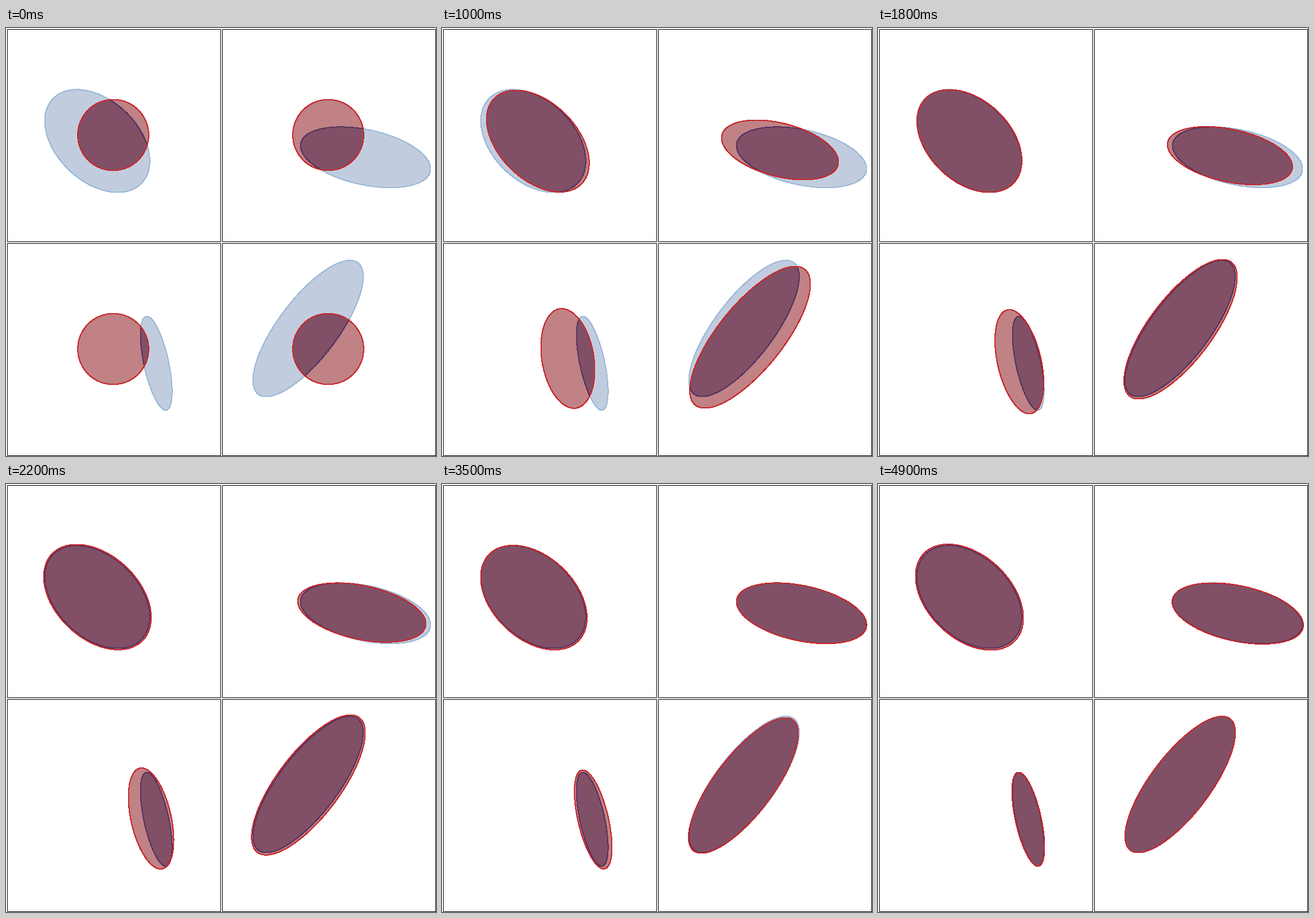
Animation, 750 px wide and 746 px high, one loop 5000 ms. Source, as a matplotlib script:

```python
import numpy as np
import matplotlib.pyplot as plt
from matplotlib.animation import FuncAnimation
from matplotlib.patches import Polygon, Rectangle

WIDTH, HEIGHT, DPI = 750, 746, 128
FRAMES, INTERVAL = 50, 100
PIXEL = 72 / DPI
START_RADIUS = 61.8

BLUE_FILL, BLUE_EDGE = "#c1cddf", "#9cb9d8"
RED_FILL, RED_EDGE = "#c08285", "#c8282c"
OVERLAP_FILL, OVERLAP_EDGE = "#815066", "#56345f"


def ellipse_points(shape):
    """Outline from centre, half extents and the x-y correlation."""
    cx, cy, half_w, half_h, corr = shape
    t = np.linspace(0, 2 * np.pi, 361)
    return np.column_stack([
        cx + 0.5 + half_w * np.cos(t),
        cy + 0.5 + half_h * np.cos(t - np.arccos(corr)),
    ])


class Panel:
    """A fixed target ellipse and a fitted one that moves towards it."""

    def __init__(self, ax, left, top, target, steps):
        ax.add_patch(Rectangle((left + 0.5, top + 0.5), 372, 370, fill=False,
                               ec="black", lw=PIXEL, zorder=0))
        start = (0, left + 185.5, top + 185, START_RADIUS, START_RADIUS, 0)
        keys = np.array([start, *steps], float)
        self.times, self.values = keys[:, 0], keys[:, 1:]

        outline = ellipse_points(target)
        fitted = ellipse_points(self.values[0])

        def shape(points, fill, edge, z):
            patch = Polygon(points, closed=True, fc=fill, ec=edge, lw=PIXEL,
                            aa=False, zorder=z)
            return ax.add_patch(patch)

        shape(outline, BLUE_FILL, BLUE_EDGE, 1)
        self.fill = shape(fitted, RED_FILL, "none", 2)
        self.overlap = shape(outline, OVERLAP_FILL, OVERLAP_EDGE, 3)
        self.edge = shape(fitted, "none", RED_EDGE, 4)

    def update(self, frame):
        state = [np.interp(frame, self.times, v) for v in self.values.T]
        points = ellipse_points(state)
        self.fill.set_xy(points)
        self.edge.set_xy(points)
        self.overlap.set_clip_path(self.fill)
        return self.fill, self.overlap, self.edge


fig = plt.figure(figsize=(WIDTH / DPI, HEIGHT / DPI), dpi=DPI, facecolor="white")
ax = fig.add_axes([0, 0, 1, 1])
ax.set(xlim=(0, WIDTH), ylim=(HEIGHT, 0))
ax.axis("off")

# Each step: time, centre x, centre y, half width, half height, correlation.
top_left = Panel(ax, 1, 1, (158.7, 196.4, 91.5, 89.6, 0.39), [
    (6, 173, 192.5, 82, 82.3, 0.31),
    (10, 166.7, 196.7, 89.5, 88.7, 0.43),
    (12, 163, 196.7, 91, 89.7, 0.42),
    (18, 159, 196.5, 91.4, 89.5, 0.38),
    (23, 159, 196.7, 94.3, 92.2, 0.39),
    (27, 158.5, 196.5, 90.5, 89, 0.39),
    (35, 159.7, 197.5, 92.7, 91, 0.39),
    (41, 159, 196.5, 92.5, 90.5, 0.39),
    (49, 159, 196.7, 94, 92.2, 0.395),
])
top_right = Panel(ax, 376, 1, (626.5, 224.8, 113.4, 52.9, 0.38), [
    (6, 577, 201, 84.5, 56, 0.26),
    (10, 589, 212, 102, 52, 0.40),
    (12, 597, 215.5, 107, 51.5, 0.39),
    (18, 613.3, 222, 109, 50.5, 0.38),
    (24, 623.5, 224.4, 113, 52.2, 0.38),
    (27, 626.2, 224.8, 112.7, 52.8, 0.38),
    (35, 626.6, 224.8, 113.5, 52.9, 0.38),
    (41, 626.4, 224.8, 113.1, 52.9, 0.38),
    (49, 627, 225.2, 114.3, 53.2, 0.38),
])
bottom_left = Panel(ax, 1, 374, (261.6, 583.8, 27.5, 81.7, 0.6), [
    (6, 206, 569, 53, 77.3, 0.14),
    (10, 219, 575.5, 47, 86.8, 0.23),
    (12, 226.5, 578.5, 46, 92, 0.28),
    (18, 246, 581.2, 42.5, 90.7, 0.41),
    (27, 260.7, 584.2, 35.7, 84.7, 0.44),
    (35, 263.2, 584.2, 32.7, 86.2, 0.56),
    (41, 261.8, 584, 29.7, 83, 0.55),
    (49, 261.6, 583.8, 28.4, 81.8, 0.59),
])
bottom_right = Panel(ax, 376, 374, (526.4, 523.2, 96.1, 118.7, -0.76), [
    (6, 546.7, 546.7, 88, 99, -0.48),
    (10, 536.8, 538.5, 105.2, 123.5, -0.75),
    (18, 527.2, 524.5, 98.7, 121.5, -0.74),
    (27, 526.5, 523.8, 99.5, 122.7, -0.745),
    (35, 525.2, 525, 95.7, 118, -0.765),
    (41, 526.2, 523.7, 98.2, 121.2, -0.755),
    (49, 526.6, 523.2, 96.1, 118.7, -0.76),
])
panels = [top_left, top_right, bottom_left, bottom_right]


def draw(frame):
    return [artist for panel in panels for artist in panel.update(frame)]


animation = FuncAnimation(fig, draw, frames=FRAMES, interval=INTERVAL,
                          repeat=True, repeat_delay=0)
plt.show()
```
